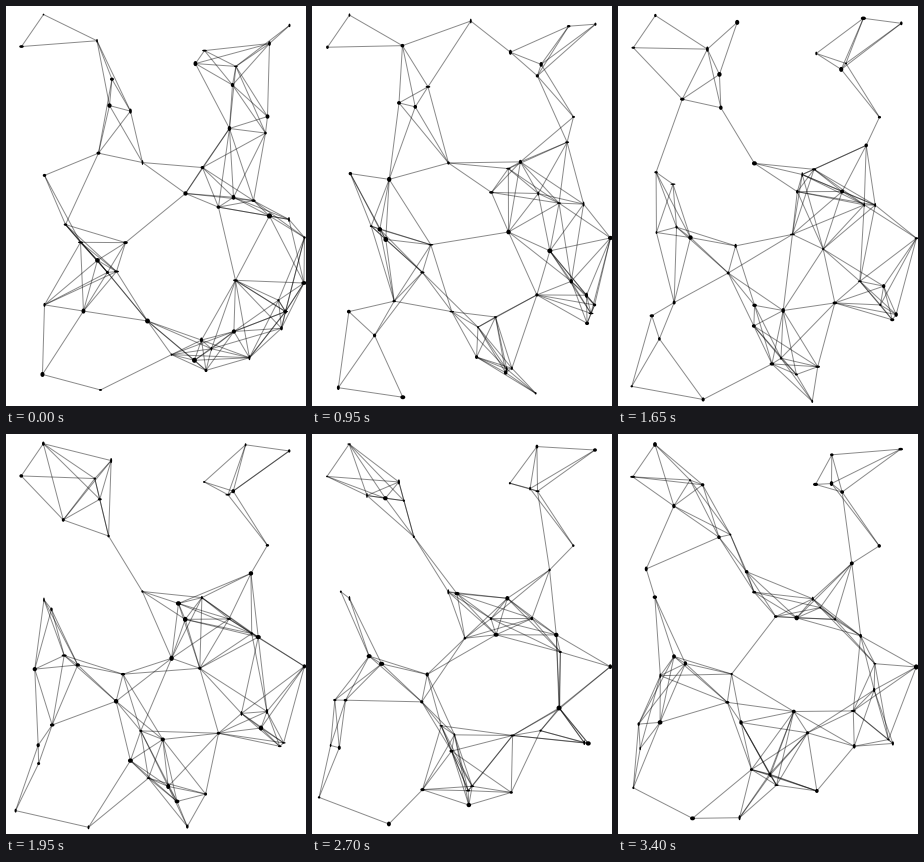
A matplotlib script for the animation above (3.45 s loop, 300 by 400 pixels).

```python
import numpy as np
import matplotlib.pyplot as plt
from matplotlib.animation import FuncAnimation
from matplotlib.collections import EllipseCollection, LineCollection

W, H, DPI = 300, 400, 100
FRAMES, STEP_MS = 69, 50
PX = 72 / DPI   # one pixel in points
REACH = 79.8    # nodes closer than this are joined
DRIFT = 4       # orbit radius of the nearly still nodes

# Start points of the drifting nodes, calmest first.
DRIFTERS = [(261, 110), (298, 231), (136, 156), (37, 8), (15, 40), (110, 265),
            (196, 161), (103, 99), (59, 218), (279, 305), (119, 236),
            (165, 348)]

# Orbits as centre x, y and radius, sorted from slow to fast.
CLOCKWISE = [(179.5, 44, 18.5), (66.5, 34, 24), (239, 194, 8), (22, 298, 16),
             (201, 273, 28), (174, 120, 49), (246, 126, 13), (84, 383, 10),
             (178, 341, 27), (197, 349, 46), (59, 145, 33), (47, 303, 30),
             (182, 199, 30), (67, 264, 34), (272, 275, 25.5), (223, 207, 40),
             (21, 367, 15), (79, 71, 26.5), (182, 322, 45.5)]
COUNTER = [(174, 364, 25.5), (271, 19, 12), (170.5, 187, 8.5), (25, 169, 13),
           (244, 322, 31), (185, 79, 41), (112, 315, 29), (67, 236, 7),
           (247, 306, 32), (220, 191, 7), (81, 106, 43), (226, 60, 3.4),
           (235, 38, 28), (164, 335, 31), (149, 356, 39), (250, 295, 22),
           (140, 60, 49), (265, 214, 17.5), (56, 256, 35)]


def ramp(count, ranks, degrees):
    """Degrees per frame, rising with a node's rank in its list."""
    return np.interp(np.arange(count), ranks, degrees)


drifters = [(x - DRIFT, y, DRIFT) for x, y in DRIFTERS]
cx, cy, radius = np.array(drifters + CLOCKWISE + COUNTER).T
speed = np.radians(np.concatenate((
    .3 + 1.7 * np.linspace(0, 1, len(drifters)) ** 2,
    ramp(len(CLOCKWISE), [0, 4, 5, 18], [.27, 1.67, 2.31, 3.79]),
    -ramp(len(COUNTER), [0, 4, 5, 8, 12, 13, 14, 18],
          [.25, .48, .68, 1.63, 2.04, 2.61, 3.25, 3.56]))))
first, second = np.triu_indices(len(cx), 1)


def positions(frame):
    angle = speed * (frame + 1)
    return np.column_stack((cx + radius * np.cos(angle),
                            cy + radius * np.sin(angle)))


def links(points):
    near = np.hypot(*(points[first] - points[second]).T) < REACH
    return np.stack((points[first[near]], points[second[near]]), axis=1)


def dot_sizes(frame):
    """Every dot takes a new random width and height in each frame."""
    return np.random.default_rng(frame).uniform(1.5, 5.2, (2, len(cx)))


fig = plt.figure(figsize=(W / DPI, H / DPI), dpi=DPI, facecolor="white")
ax = fig.add_axes([0, 0, 1, 1])
ax.set_xlim(-.5, W - .5)  # whole numbers lie on pixel centres
ax.set_ylim(H - .5, -.5)
ax.axis("off")

lines = LineCollection([], colors="black", linewidths=PX, alpha=.45)
ax.add_collection(lines)
dots = None


def draw(frame):
    global dots
    points = positions(frame)
    lines.set_segments(links(points))
    if dots is not None:
        dots.remove()
    widths, heights = dot_sizes(frame)
    dots = EllipseCollection(widths, heights, np.zeros(len(cx)), units="xy",
                             offsets=points, offset_transform=ax.transData,
                             facecolors="black", edgecolors="none", zorder=3)
    ax.add_collection(dots, autolim=False)
    return lines, dots


anim = FuncAnimation(fig, draw, frames=FRAMES, interval=STEP_MS,
                     init_func=lambda: draw(0), repeat=True, repeat_delay=0)
plt.show()
```
